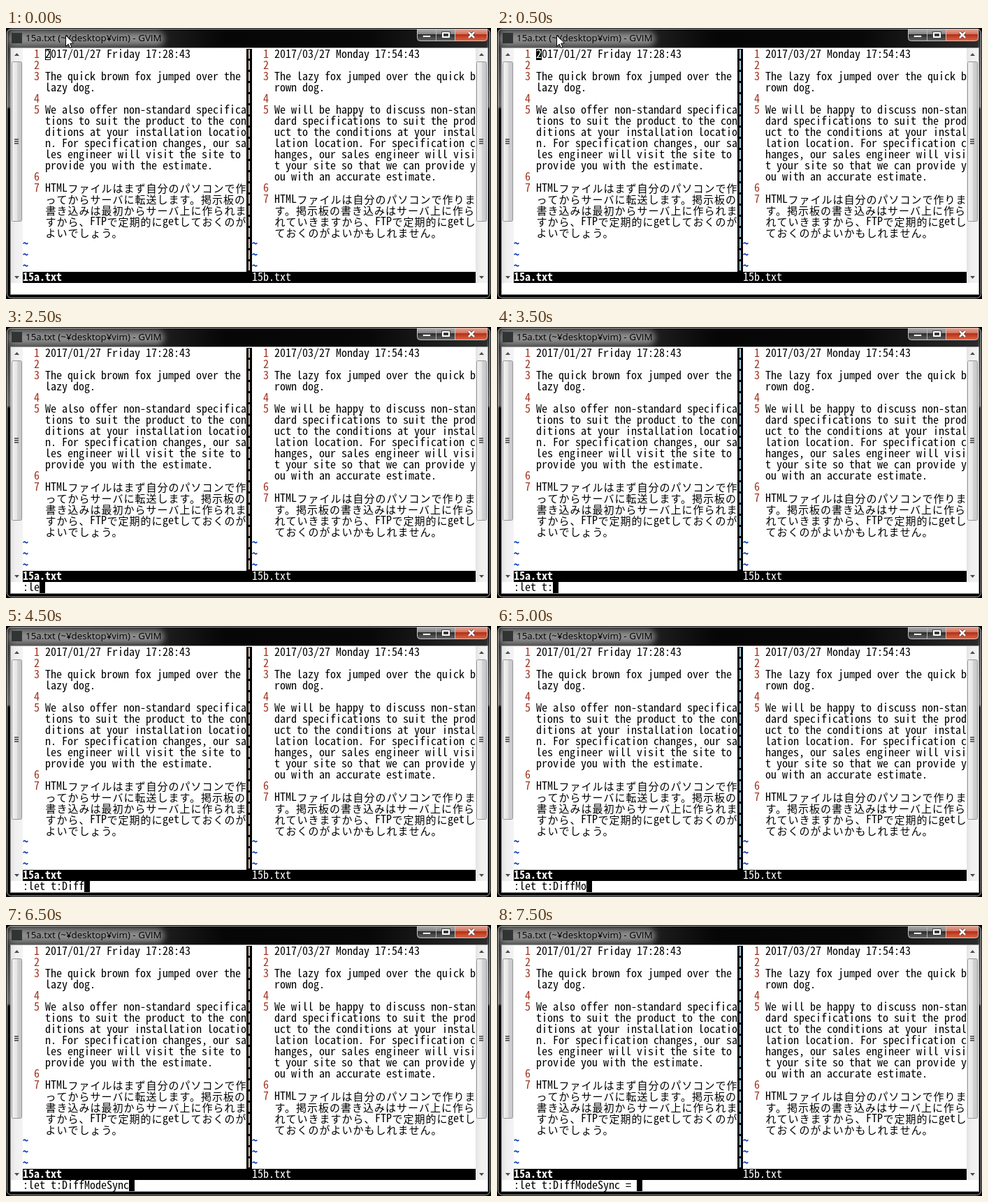
An HTML page with a canvas for the animation above (8000 ms loop, 694x389 px).

```html
<!DOCTYPE html>
<html lang="ja">
<head>
<meta charset="utf-8">
<title>GVIM</title>
<style>
html, body { margin: 0; width: 100%; height: 100%; overflow: hidden; background: #000; }
canvas { display: block; }
</style>
</head>
<body>
<canvas id="stage" width="694" height="389"></canvas>
<script>
const ctx = document.getElementById('stage').getContext('2d');
const W = 694, H = 389, LOOP = 8000;
const CELL = 8, ROW = 16, LEFT = 24, RIGHT = 352, TOP = 30, STATUS = 20, COMMAND = 21;
const MONO_FAMILY = '"Noto Sans Mono CJK JP", "Noto Sans Mono", "DejaVu Sans Mono", monospace';
const MONO = cellSize(MONO_FAMILY) + 'px ' + MONO_FAMILY;
const WIDE = '15px "Noto Sans CJK JP", "Noto Sans CJK", sans-serif';
const UI = '13.4px "Open Sans", "Noto Sans", sans-serif';

// Each paragraph is a numbered buffer line, already wrapped.
const BUFFER_A = [
  ['2017/01/27 Friday 17:28:43'],
  [''],
  ['The quick brown fox jumped over the ', 'lazy dog.'],
  [''],
  ['We also offer non-standard specifica', 'tions to suit the product to the con',
   'ditions at your installation locatio', 'n. For specification changes, our sa',
   'les engineer will visit the site to ', 'provide you with the estimate.'],
  [''],
  ['HTMLファイルはまず自分のパソコンで作', 'ってからサーバに転送します。掲示板の',
   '書き込みは最初からサーバ上に作られま', 'すから、FTPで定期的にgetしておくのが', 'よいでしょう。']
];
const BUFFER_B = [
  ['2017/03/27 Monday 17:54:43'],
  [''],
  ['The lazy fox jumped over the quick b', 'rown dog.'],
  [''],
  ['We will be happy to discuss non-stan', 'dard specifications to suit the prod',
   'uct to the conditions at your instal', 'lation location. For specification c',
   'hanges, our sales engineer will visi', 't your site so that we can provide y',
   'ou with an accurate estimate.'],
  [''],
  ['HTMLファイルは自分のパソコンで作りま', 'す。掲示板の書き込みはサーバ上に作ら',
   'れていきますから、FTPで定期的にgetし', 'ておくのがよいかもしれません。']
];
const COMMAND_TEXT = ':let t:DiffModeSync = ';
const TYPE_START = 2000, TYPE_STEP = 500;

// Font size at which one letter fills one cell.
function cellSize(family) {
  ctx.font = '100px ' + family;
  return CELL * 100 / ctx.measureText('0').width;
}

const rowY = row => TOP + row * ROW;

function rect(x, y, w, h, fill) {
  ctx.fillStyle = fill;
  ctx.fillRect(x, y, w, h);
}

function gradient(x0, y0, x1, y1, ...stops) {
  const g = ctx.createLinearGradient(x0, y0, x1, y1);
  stops.forEach(([at, color]) => g.addColorStop(at, color));
  return g;
}

function rounded(x, y, w, h, radii, fill, stroke) {
  ctx.beginPath();
  ctx.roundRect(x, y, w, h, radii);
  if (fill) { ctx.fillStyle = fill; ctx.fill(); }
  if (stroke) { ctx.strokeStyle = stroke; ctx.lineWidth = 1; ctx.stroke(); }
}

function polygon(points, fill, stroke) {
  ctx.beginPath();
  points.forEach(([x, y]) => ctx.lineTo(x, y));
  ctx.closePath();
  ctx.fillStyle = fill;
  ctx.fill();
  if (stroke) { ctx.strokeStyle = stroke; ctx.lineWidth = 1; ctx.stroke(); }
}

// Terminal text: half-width runs take one cell per letter, full-width two.
function write(text, x, row, color = '#000', bold = false) {
  ctx.fillStyle = color;
  for (const run of text.match(/[\x20-\x7e]+|[^\x20-\x7e]+/g) || []) {
    const half = run.charCodeAt(0) < 127;
    ctx.font = (bold ? 'bold ' : '') + (half ? MONO : WIDE);
    ctx.letterSpacing = half ? '0px' : '1px';
    ctx.fillText(run, x + (half ? 0 : 0.5), rowY(row) + (half ? 13 : 13.5));
    x += run.length * CELL * (half ? 1 : 2);
  }
  ctx.letterSpacing = '0px';
}

function pane(x, buffer) {
  let row = 0;
  buffer.forEach((lines, i) => {
    write(String(i + 1), x + 2 * CELL, row, '#a03420');
    for (const line of lines) write(line, x + 4 * CELL, row++);
  });
  while (row < STATUS) write('~', x, row++, '#0038b8', true);
}

function scrollbar(x) {
  const end = rowY(COMMAND), mid = x + 8.5;
  rect(x, TOP - 1, 17, end - TOP + 1, gradient(x, 0, x + 17, 0, [0, '#e3e3e3'], [0.4, '#f0f0f0'], [1, '#f3f3f3']));
  polygon([[mid - 3.5, 40], [mid, 36], [mid + 3.5, 40]], '#4c4c4c');
  polygon([[mid - 3.5, 356], [mid, 360], [mid + 3.5, 356]], '#4c4c4c');
  rounded(x + 1.5, 48.5, 14, 229, 2,
    gradient(x, 0, x + 17, 0, [0, '#f5f5f5'], [0.5, '#e6e6e6'], [0.52, '#d3d3d5'], [1, '#c4c4c6']), '#979797');
  for (let i = 0; i < 3; i++) {
    rect(x + 5, 159 + i * 3, 6, 1, '#444');
    rect(x + 5, 160 + i * 3, 6, 1, '#8a8a8a');
  }
}

function windowButtons() {
  const glass = gradient(0, 1, 0, 19, [0, '#b4b4b4'], [0.45, '#808080'], [0.47, '#2c2c2c'], [1, '#6a6a6a']);
  const red = gradient(0, 1, 0, 19, [0, '#e8ab9a'], [0.45, '#d0705c'], [0.47, '#b43018'], [1, '#de6a48']);
  rounded(588.5, 1.5, 54, 17, [0, 0, 0, 4], glass, '#c4c4c4');
  rounded(642.5, 1.5, 46, 17, [0, 0, 4, 0], red, '#d8bdb6');
  rect(615, 2, 1, 16, '#b4b4b4');

  rounded(596.5, 10.5, 11, 3, 1, '#fff', '#444');
  for (const [color, width] of [['#444', 4], ['#fff', 2]]) {
    ctx.strokeStyle = color;
    ctx.lineWidth = width;
    ctx.strokeRect(625, 7, 9, 6);
  }
  for (const [color, width] of [['#5a3a38', 4.5], ['#fff', 2.5]]) {
    ctx.strokeStyle = color;
    ctx.lineWidth = width;
    ctx.beginPath();
    ctx.moveTo(662, 6); ctx.lineTo(670, 14);
    ctx.moveTo(670, 6); ctx.lineTo(662, 14);
    ctx.stroke();
  }
}

function windowFrame() {
  rect(0, 0, W, H, '#000');
  rounded(1, 1, W - 2, H - 2, 6,
    gradient(0, 0, 0, H, [0, '#2c2c2c'], [0.08, '#404040'], [0.29, '#6c6c6c'], [0.3, '#060606'], [1, '#040404']));
  rect(6, 2, W - 12, 27,
    gradient(0, 0, W, 0, [0, '#484848'], [0.3, '#222'], [0.45, '#060606'], [0.75, '#080808'], [1, '#2c2c2c']));

  ctx.save();
  ctx.beginPath();
  ctx.rect(1, 1, W - 2, 27);
  ctx.clip();
  ctx.filter = 'blur(5px)';
  rounded(4, 6, 222, 19, 9, '#8e8e8e');
  ctx.restore();
  rounded(1.5, 1.5, W - 3, H - 3, 6, null, '#b4b4b4');

  rect(8, 7, 15, 15, '#303432');
  ctx.font = UI;
  ctx.fillStyle = '#000';
  ctx.fillText('15a.txt (~¥desktop¥vim) - GVIM', 28, 19);
  windowButtons();

  ctx.strokeStyle = '#9a9a9a';
  ctx.lineWidth = 1;
  ctx.strokeRect(6.5, 28.5, 683, 354);
  rect(7, 29, 682, 353, '#fff');
}

function editor() {
  scrollbar(7);
  scrollbar(672);
  pane(LEFT, BUFFER_A);
  pane(RIGHT, BUFFER_B);

  rect(344, TOP, CELL, STATUS * ROW, '#000');
  for (let row = 0; row < STATUS; row++) {
    rect(347, rowY(row) + 1, 1, 13, '#e8d4bc');
    rect(348, rowY(row) + 1, 1, 13, '#8cc8f0');
  }
  rect(LEFT, rowY(STATUS), 648, ROW, '#000');
  write('15a.txt', LEFT, STATUS, '#fff', true);
  write('15b.txt', RIGHT, STATUS, '#fff');
}

function textCursor(solid) {
  const x = LEFT + 4 * CELL;
  if (solid) {
    rect(x, TOP, CELL, ROW, '#000');
    write('2', x, 0, '#fff');
  } else {
    ctx.strokeStyle = '#000';
    ctx.lineWidth = 1;
    ctx.strokeRect(x + 0.5, TOP + 0.5, CELL - 1, ROW - 1);
  }
}

function pointer(x, y) {
  const shape = [[0, 0], [0, 16], [3.7, 12.5], [6, 18], [8.5, 17], [6.2, 11.7], [11, 11.3]];
  polygon(shape.map(([dx, dy]) => [x + dx, y + dy]), '#fff', '#000');
}

// Two letters per step; only the blank after the name comes alone.
function typedLength(t) {
  const step = Math.floor((t - TYPE_START) / TYPE_STEP);
  return step < 10 ? 1 + 2 * step : 2 * step;
}

function commandLine(t) {
  const typed = COMMAND_TEXT.slice(0, typedLength(t));
  write(typed, LEFT, COMMAND);
  rect(LEFT + typed.length * CELL, rowY(COMMAND), CELL, ROW, '#000');
}

function draw(t) {
  windowFrame();
  editor();
  if (t < TYPE_START) {
    textCursor(t >= 500);
    pointer(85.5, 10.5);
  } else {
    commandLine(t);
  }
}

const start = performance.now();
function tick() {
  draw((performance.now() - start) % LOOP);
  requestAnimationFrame(tick);
}
tick();
</script>
</body>
</html>
```
